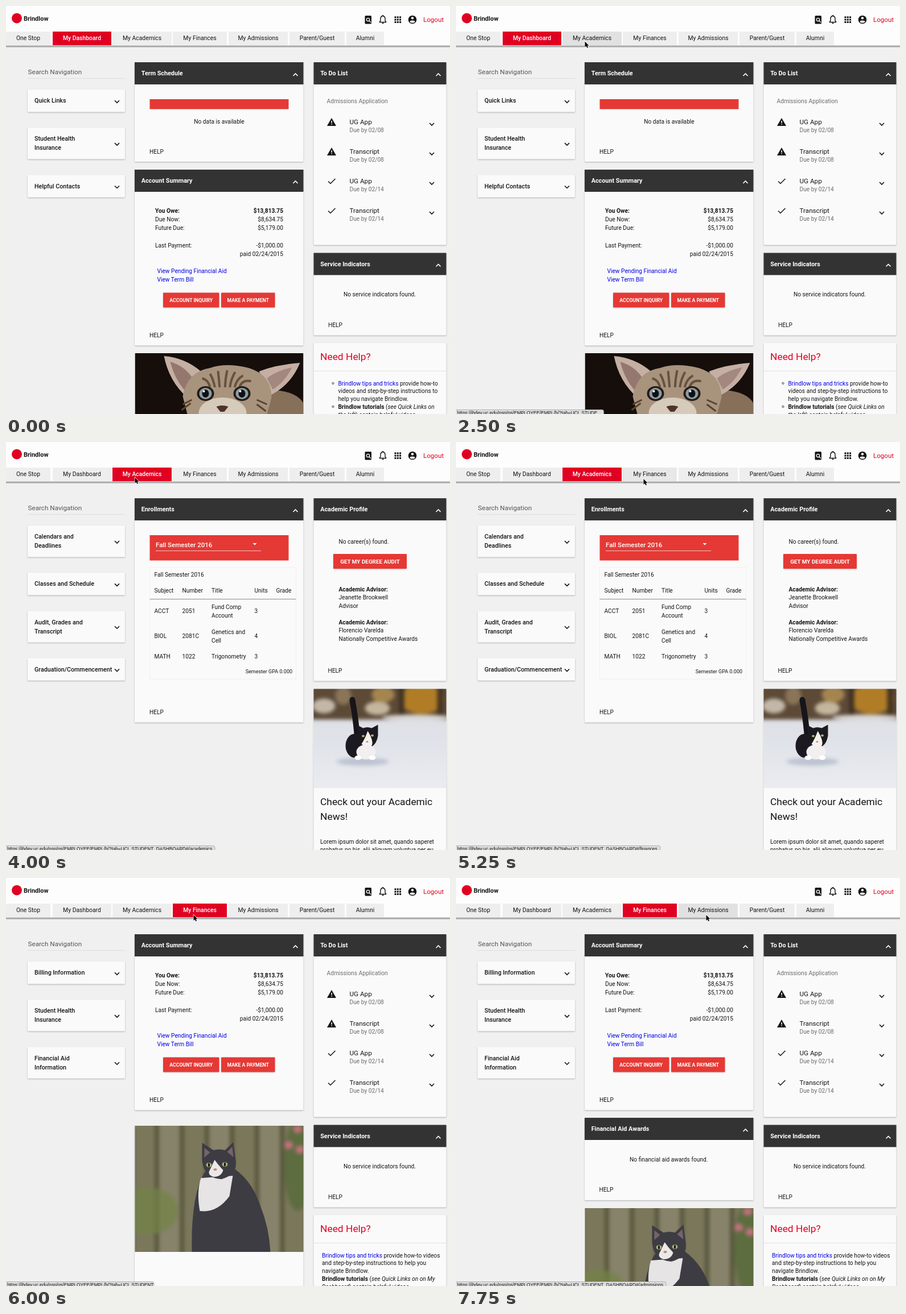
Write an HTML page that moves like this. It is 780 px wide and 718 px high and loops after 8 s.

```html
<!DOCTYPE html>
<html lang="en">
<head>
<meta charset="utf-8">
<title>Student portal</title>
<style>
  html, body { margin: 0; height: 100%; overflow: hidden; background: #f0f0f0; }
  #stage { display: block; width: 100vw; height: 100vh; font-family: Roboto, Arial, sans-serif; }
  #stage text { white-space: pre; }
  .card { fill: #fafafa; filter: drop-shadow(0 1px 1.2px rgba(0, 0, 0, .27)); }
  .link { fill: #0000e6; }
  .blurred { filter: blur(3px); }
  .soft { filter: blur(.6px); }
</style>
</head>
<body>
<svg id="stage" viewBox="0 0 780 718"></svg>
<script>
const LOOP = 8000;
const RED = '#e00122', BAR = '#e53935', INK = '#141414', GRAY = '#6c6c6c';
const BRAND = 'Brindlow';
const stage = document.getElementById('stage');

// ---------- primitives ----------
const text = (x, y, content, size = 10.2, attrs = '') =>
  `<text x="${x}" y="${y}" font-size="${size}" fill="${INK}" ${attrs}>${content}</text>`;
const tinted = (x, y, content, size, fill, attrs = '') =>
  text(x, y, content, size, `style="fill:${fill}" ${attrs}`);
const bold = 'font-weight="700"', medium = 'font-weight="500"';
const centered = 'text-anchor="middle"', right = 'text-anchor="end"';
const rect = (x, y, w, h, fill, attrs = '') =>
  `<rect x="${x}" y="${y}" width="${w}" height="${h}" fill="${fill}" ${attrs}/>`;
const ellipse = (x, y, rx, ry, fill, attrs = '') =>
  `<ellipse cx="${x}" cy="${y}" rx="${rx}" ry="${ry}" fill="${fill}" ${attrs}/>`;
const path = (d, fill, attrs = '') => `<path d="${d}" fill="${fill}" ${attrs}/>`;
const line = (d, color, width = 1) =>
  path(d, 'none', `stroke="${color}" stroke-width="${width}"`);
const group = (name, ...content) => `<g class="${name}">${content.join('')}</g>`;
const chevron = (x, y, dir, color, scale = 1) =>
  line(`M${x - 4 * scale} ${y - 2 * dir * scale}L${x} ${y + 2 * dir * scale}L${x + 4 * scale} ${y - 2 * dir * scale}`, color, 1.6);
const button = (x, y, w, label, size) =>
  rect(x, y, w, 26, BAR, 'rx="1" style="filter:drop-shadow(0 1px 1px #0003)"') +
  tinted(x + w / 2, y + 13 + size * .36, label, size, '#fff', `${bold} ${centered}`);
const help = (x, y) => text(x, y, 'HELP');

function card(x, y, w, h, title, chevronScale = 1) {
  const body = `<rect class="card" x="${x}" y="${y}" width="${w}" height="${h}" rx="1"/>`;
  if (!title) return body;
  return body + rect(x, y, w, 39, '#333') +
    tinted(x + 11.7, y + 23, title, 10.8, '#fff', bold) +
    (chevronScale ? chevron(x + w - 14, y + 22 + 7 * (1 - chevronScale), -1, '#fff', chevronScale) : '');
}

const photo = (x, y, w, h, content) =>
  `<svg x="${x}" y="${y}" width="${w}" height="${h}">${content}</svg>`;
const gradient = (id, ...stops) =>
  `<linearGradient id="${id}" x2="0" y2="1">${stops.map(([at, color]) =>
    `<stop offset="${at}" stop-color="${color}"/>`).join('')}</linearGradient>`;

// ---------- photographs ----------
function kitten(x, y) {
  const stripes = [-40, -26, -12, 4, 18, 32, 46].map(dx =>
    line(`M${158 + dx} ${30 + dx * dx / 110}Q${156 + dx * .7} 46 ${156 + dx * .6} 60`, '#66523f', 4)).join('');
  const eye = cx => ellipse(cx, 71, 15, 13, '#241a15') + ellipse(cx, 71, 11, 10, '#8b9da3') +
    ellipse(cx, 71, 6, 7, '#101014') + ellipse(cx - 3, 67, 2, 2, '#fff');
  return photo(x, y, 296, 107,
    rect(0, 0, 296, 107, '#150e0b') + group('soft',
      path('M195 107Q215 62 255 66Q285 70 296 88V107Z', '#86705a'),
      path('M51 5Q88 8 116 32L92 78Q60 50 51 5Z', '#c4afa2'),
      path('M62 15Q86 22 100 42L88 66Q70 46 62 15Z', '#947870'),
      path('M290 17Q250 20 218 32L238 74Q274 56 290 17Z', '#c4afa2'),
      path('M276 25Q250 30 232 44L242 64Q264 50 276 25Z', '#a38880'),
      path('M84 76Q92 32 132 26Q160 16 200 26Q240 38 240 78L232 107H92Z', '#a8937d'), stripes,
      ellipse(154, 105, 42, 27, '#d6cabb'), eye(124), eye(188),
      path('M143 94Q153 90 164 94L157 103H150Z', '#4d332d'),
      line('M100 82L84 90M98 88L82 100M214 82L232 90M214 90L230 102', '#57432f', 3)));
}

function snowCat(x, y) {
  return photo(x, y, 233, 174.5,
    gradient('snow', [0, '#dcdee3'], [.5, '#dfe2e8'], [1, '#eaecf1']) +
    rect(0, 0, 234, 175, 'url(#snow)') + group('blurred',
      rect(-10, -10, 254, 64, '#5c4a37'),
      ellipse(18, 30, 20, 13, '#c2b7a8'), ellipse(52, 12, 14, 16, '#8a7558'),
      ellipse(112, 34, 22, 12, '#c4b59e'), ellipse(122, 10, 20, 14, '#a5854f'),
      ellipse(190, 18, 38, 26, '#b07d26'), rect(150, -6, 9, 56, '#3e3023'), rect(217, -6, 10, 58, '#46341f'),
      ellipse(180, 50, 60, 5, '#d9d6d2'), ellipse(86, 128, 46, 7, '#bcc3d0')) + group('soft',
      line('M77 92Q75 58 68 20', '#17151a', 10), ellipse(68, 20, 5, 6, '#17151a'),
      ellipse(72, 100, 16, 21, '#1c1a20'),
      path('M78 78L77 64L87 69Q94 66 102 69L113 63L113 82Q110 102 94 104Q78 100 78 78Z', '#1c1a20'),
      ellipse(92, 111, 17, 13, '#f1eff0'), path('M95 74Q106 92 102 100Q92 104 84 97Q90 88 95 74Z', '#f4f1ef'),
      ellipse(87, 83, 2.5, 2, '#b5b45a'), ellipse(103, 82, 2.5, 2, '#b5b45a'), ellipse(94, 93, 2, 1.5, '#c98983'),
      ellipse(78, 121, 6, 4, '#fff'), ellipse(103, 121, 6, 4, '#fff')));
}

function gardenCat(x, y) {
  const planks = [0, 1, 2, 3, 4, 5, 6].map(i =>
    rect(i * 44 - 2, -10, 37, 242, i % 2 ? '#87826a' : '#7b775b')).join('');
  const blossoms = [[286, 6], [270, 34], [290, 42]].map(([px, py]) => ellipse(px, py, 8, 7, '#c0717d')).join('');
  return photo(x, y, 296, 222,
    rect(0, 0, 296, 222, '#55553a') + group('blurred', planks,
      ellipse(20, 150, 56, 42, '#738347', 'opacity=".7"'),
      ellipse(286, 70, 24, 80, '#566b39', 'opacity=".8"'), blossoms) + group('soft',
      path('M100 222Q98 124 122 82L166 70Q204 92 220 140Q236 180 238 222Z', '#3d3c43'),
      path('M116 92Q108 116 114 150Q144 154 166 124L172 88Z', '#e6e4e4'),
      path('M118 60L118 30L138 43Q148 40 158 43L173 29L177 60Q181 86 152 94Q120 92 118 60Z', '#3d3c43'),
      path('M122 39L132 47L122 56ZM171 37L162 46L173 55Z', '#74656a'),
      path('M140 60Q147 70 155 78Q152 90 138 90Q126 86 132 77Z', '#ece8e7'),
      ellipse(130, 69, 5, 4, '#a8ad72'), ellipse(158, 68, 5, 4, '#a8ad72'),
      ellipse(130, 69, 1.5, 3.5, '#111'), ellipse(158, 68, 1.5, 3.5, '#111'),
      ellipse(141, 77, 3, 2, '#b98a86')));
}

// ---------- page header ----------
const TABS = [['One Stop', 0, 78], ['My Dashboard', 82, 185], ['My Academics', 187, 291], ['My Finances', 293, 388],
  ['My Admissions', 391, 495], ['Parent/Guest', 498, 595], ['Alumni', 598, 664]];
const HOVER = '#e1e1e1', SOFT_HOVER = '#e8e8e8';

function header(fills) {
  const tabs = TABS.map(([label, x1, x2], i) => {
    const fill = fills[i] || '#eeeeee';
    const lit = fills[i] && fill !== HOVER && fill !== SOFT_HOVER;
    return rect(x1, 45, x2 - x1, 24, fill) +
      tinted((x1 + x2) / 2, 60, label, 10.4, lit ? '#fff' : INK, centered + (lit ? ' ' + medium : ''));
  }).join('');
  const dots = [0, 1, 2].map(r => [0, 1, 2].map(c =>
    rect(682.5 + c * 4.3, 18.3 + r * 4.3, 3, 3, INK)).join('')).join('');
  const icons =
    rect(630.5, 17, 11.5, 14.5, INK, 'rx="1.5"') +
    `<circle cx="636" cy="24" r="2.7" fill="none" stroke="#fff" stroke-width="1.3"/>` +
    line('M638 26L641 29', '#fff', 1.3) +
    path('M656.5 28.5V27.5L658 26V22Q658 18.6 661 18V17H663V18Q666 18.6 666 22V26L667.5 27.5V28.5Z', 'none', `stroke="${INK}" stroke-width="1.4"`) +
    rect(660.5, 29.5, 3, 1.7, INK) + dots +
    ellipse(714, 24, 7.3, 7.3, INK) + ellipse(714, 21.3, 2.2, 2.2, '#fff') + ellipse(714, 27.4, 4.3, 2, '#fff');
  return rect(0, 0, 780, 70, '#fdfdfd') +
    ellipse(19, 21.5, 9, 9, RED) + text(31, 25.5, BRAND, 11, bold) +
    tabs + rect(0, 69.5, 780, 3, '#a9a9a9') + icons + tinted(733, 28, 'Logout', 11.6, RED);
}

// ---------- panels ----------
function sidebar(items) {
  let y = 147;
  return tinted(38.5, 119.5, 'Search Navigation', 11.7, '#555') + line('M38 127.5H209', '#dcdcdc') +
    items.map(lines => {
      const h = 23.5 + 16 * lines.length;
      const out = card(38, y, 171, h) + chevron(195, y + 13.5 + 7.75 * lines.length, 1, INK) +
        lines.map((s, i) => text(50, y + 23.3 + 16 * i, s, 10.7, medium)).join('');
      y += h + 27.6;
      return out;
    }).join('');
}

function account(y) {
  const rows = [['You Owe:', '$13,813.75', 76, bold], ['Due Now:', '$8,634.75', 91], ['Future Due:', '$5,179.00', 106],
    ['Last Payment:', '-$1,000.00', 136.5], ['', 'paid 02/24/2015', 151.5]];
  return card(226, y, 296.5, 309.5, 'Account Summary') +
    rows.map(([label, value, dy, weight = '']) =>
      text(262, y + dy, label, 10.2, weight) + text(487, y + dy, value, 10.2, `${right} ${weight}`)).join('') +
    text(265.5, y + 182, '<tspan class="link">View Pending Financial Aid</tspan>') +
    text(265.5, y + 197, '<tspan class="link">View Term Bill</tspan>') +
    button(276, y + 216.5, 98.5, 'ACCOUNT INQUIRY', 8.7) + button(378, y + 216.5, 94.5, 'MAKE A PAYMENT', 8.7) +
    help(252, y + 294.5);
}

const emptyPanel = (x, y, w, title, message) =>
  card(x, y, w, 145, title) + text(x + w / 2 - .5, y + 76.5, message, 10.2, centered) + help(x + 25.5, y + 130);

function todo() {
  const items = [['UG App', '02/08'], ['Transcript', '02/08'], ['UG App', '02/14'], ['Transcript', '02/14']];
  return card(540.5, 99, 233, 321.5, 'To Do List') +
    tinted(563.5, 170.5, 'Admissions Application', 10.2, GRAY) +
    items.map(([name, due], i) => {
      const y = 208 + 52 * i;
      const icon = i < 2
        ? path(`M564 ${y + 3}L572 ${y - 11}L580 ${y + 3}Z`, INK) + rect(571.3, y - 6, 1.5, 4, '#fff') + rect(571.3, y - .8, 1.5, 1.5, '#fff')
        : line(`M566 ${y - 3.5}L570 ${y + .5}L578.5 ${y - 8}`, INK, 1.5);
      return icon + text(603.5, y, name, 11.7) + tinted(603.5, y + 14, 'Due by ' + due, 10.2, GRAY) +
        chevron(748, y, 1, INK);
    }).join('');
}

function needHelp(x, lines, bulleted) {
  const bullets = bulleted ? [664, 705].map(y =>
    `<circle cx="574.5" cy="${y}" r="1.6" fill="none" stroke="${INK}" stroke-width=".8"/>`).join('') : '';
  return card(540.5, 593, 233, 140) + tinted(552, 623, 'Need Help?', 17.4, RED) +
    line('M541 642.5H773', '#e2e2e2') + bullets +
    lines.map((s, i) => text(x, 667.5 + 13.8 * i, s)).join('');
}
const tipsLink = `<tspan class="link">${BRAND} tips and tricks</tspan>`;
const tutorials = `<tspan ${bold}>${BRAND} tutorials</tspan>`;
const italic = s => `<tspan font-style="italic">${s}</tspan>`;

const financeColumn = () => todo() +
  emptyPanel(540.5, 434.5, 233, 'Service Indicators', 'No service indicators found.');

// ---------- pages ----------
const pages = {
  dashboard: () =>
    sidebar([['Quick Links'], ['Student Health', 'Insurance'], ['Helpful Contacts']]) +
    card(226, 99, 296.5, 175, 'Term Schedule') + rect(252.5, 164, 244, 17.5, BAR) +
    text(374.5, 206.5, 'No data is available', 10.2, centered) + help(252, 259.5) +
    account(288) + kitten(226.5, 611) + financeColumn() +
    needHelp(583.5, [`${tipsLink} provide how-to`, 'videos and step-by-step instructions to', `help you navigate ${BRAND}.`,
      `${tutorials} (${italic('see Quick Links on')}`, `${italic('the left')}) contain helpful videos`], true),

  academics: ({ chevronScale, enrolled, news }) =>
    sidebar([['Calendars and', 'Deadlines'], ['Classes and Schedule'], ['Audit, Grades and', 'Transcript'], ['Graduation/Commencement']]) +
    card(226, 99, 296.5, enrolled ? 394.5 : 39, 'Enrollments', chevronScale) + (enrolled ? enrollments() : '') +
    card(540.5, 99, 233, 321.5, 'Academic Profile') +
    text(584.5, 179, 'No career(s) found.') + button(575, 197, 129, 'GET MY DEGREE AUDIT', 9.9) +
    [['Jeanette Brookwell', 'Advisor'], ['Florencio Varelda', 'Nationally Competitive Awards']].map(([name, role], i) => {
      const y = 263 + 58 * i;
      return text(584.5, y, 'Academic Advisor:', 10.2, bold) + text(584.5, y + 14.3, name) + text(584.5, y + 28.6, role);
    }).join('') + help(565.5, 405.5) +
    (news ? card(540.5, 434.5, 233, 300) + snowCat(540.5, 434.5) +
      text(552, 639, 'Check out your Academic', 17.4) + text(552, 665, 'News!', 17.4) +
      text(552, 706.5, 'Lorem ipsum dolor sit amet, quando saperet') +
      text(552, 720.5, 'probatus no his, alii aliquam voluptua per eu') : ''),

  finances: ({ feed }) =>
    sidebar([['Billing Information'], ['Student Health', 'Insurance'], ['Financial Aid', 'Information']]) +
    account(99) + feeds[feed]() + financeColumn() +
    needHelp(555, [`${tipsLink} provide how-to videos`, 'and step-by-step instructions to help you', `navigate ${BRAND}.`,
      `${tutorials} (${italic('see Quick Links on on My')}`, `${italic('Dashboard')}) contain helpful videos`]),
};

const feeds = {
  none: () => card(226, 436, 296.5, 70) + text(238, 466, 'No news found.', 17.4) +
    tinted(238, 484, 'Sorry, we were unable to find any news stories.', 10.2, GRAY),
  photo: () => card(226, 436, 296.5, 300) + gardenCat(226.5, 436),
  awards: () => emptyPanel(226, 422, 296.5, 'Financial Aid Awards', 'No financial aid awards found.') + gardenCat(226.5, 581),
};

function enrollments() {
  const columns = [260.5, 309.5, 361, 436.5, 474.5];
  const row = (y, ...cells) => cells.map((s, i) => Array.isArray(s)
    ? text(columns[i], y - 7, s[0]) + text(columns[i], y + 8, s[1])
    : text(columns[i], y, s)).join('');
  return rect(252.5, 164, 244, 44.5, BAR) + tinted(263, 185, 'Fall Semester 2016', 11.5, '#fff', medium) +
    line('M263 191.5H448', '#ffffffb0') + path('M433.5 178H440.5L437 181.5Z', '#fff') +
    rect(252.5, 220.5, 257, 197, 'none', 'stroke="#f0f0f0"') + text(260.5, 237, 'Fall Semester 2016') +
    row(265, 'Subject', 'Number', 'Title', 'Units', 'Grade') + line('M252.5 276.5H509.5', '#8a8a8a') +
    row(301, 'ACCT', '2051', ['Fund Comp', 'Account'], '3') +
    row(344.5, 'BIOL', '2081C', ['Genetics and', 'Cell'], '4') +
    row(380.5, 'MATH', '1022', 'Trigonometry', '3') +
    text(503, 407, 'Semester GPA 0.000', 9, right) + help(252, 478.5);
}

// ---------- overlays ----------
const URL_BASE = 'https://ihdev.uc.edu/psp/ps/EMPLOYEE/EMPL/h/?tab=UCI_STUDE';
const statusBar = ([width, tail]) =>
  path(`M-1 720V710.5H${width - 3}Q${width} 710.5 ${width} 713.5V720Z`, '#dedede', 'stroke="#a5a5a5" stroke-width=".8"') +
  text(2, 718.7, URL_BASE + tail, 8.24, 'font-family="Liberation Sans, Arial, sans-serif"');
const pointer = ([x, y]) =>
  path('M0 0V10L2.3 7.9L3.9 11.2L5.5 10.5L4 7.3H7Z', '#000',
    `transform="translate(${x} ${y})" stroke="#fff" stroke-width="1.4" paint-order="stroke"`);

// ---------- timeline: each step overrides what came before ----------
const steps = [
  [0, { page: 'dashboard', fills: { 1: RED } }],
  [500, { cursor: [466, 67] }],
  [750, { cursor: [346, 118] }],
  [1000, { cursor: [260, 72] }],
  [1250, { cursor: [216, 57.5] }],
  [1500, { cursor: [217, 63] }],
  [2000, { cursor: [224, 61], fills: { 1: RED, 2: SOFT_HOVER }, status: [259.5, '...'] }],
  [2250, { cursor: [226.5, 62.5] }],
  [2500, { fills: { 1: RED, 2: HOVER } }],
  [2750, { page: 'academics', fills: { 2: RED }, chevronScale: 0 }],
  [3000, { news: true, chevronScale: .35 }],
  [3250, { chevronScale: .6 }],
  [3500, { chevronScale: .85, status: [360, 'NT_DASHBOARD#/academics'] }],
  [3750, { chevronScale: 1, status: [367, 'NT_DASHBOARD#/academics'] }],
  [4000, { enrolled: true }],
  [5000, { cursor: [296, 65], fills: { 2: RED, 3: SOFT_HOVER }, status: [359, 'NT_DASHBOARD#/finances'] }],
  [5250, { cursor: [329.5, 65] }],
  [5500, { fills: { 2: '#e77b88', 3: '#e66a79' }, status: [260, 'NT'] }],
  [5750, { page: 'finances', fills: { 3: RED }, feed: 'none' }],
  [6000, { feed: 'photo' }],
  [6250, { feed: 'awards' }],
  [7250, { cursor: [350, 62] }],
  [7500, { cursor: [438, 65], fills: { 3: RED, 4: HOVER }, status: [369, 'NT_DASHBOARD#/admissions'] }],
  [7750, { cursor: [439.5, 65] }],
];

let shown = 0;
function render(time) {
  const past = steps.filter(([at]) => at <= time % LOOP);
  if (past.length !== shown) {
    shown = past.length;
    const state = Object.assign({}, ...past.map(([, change]) => change));
    stage.innerHTML = rect(0, 0, 780, 718, '#f0f0f0') + header(state.fills) + pages[state.page](state) +
      (state.status ? statusBar(state.status) : '') + (state.cursor ? pointer(state.cursor) : '');
  }
  requestAnimationFrame(render);
}
render(performance.now());
</script>
</body>
</html>
```
